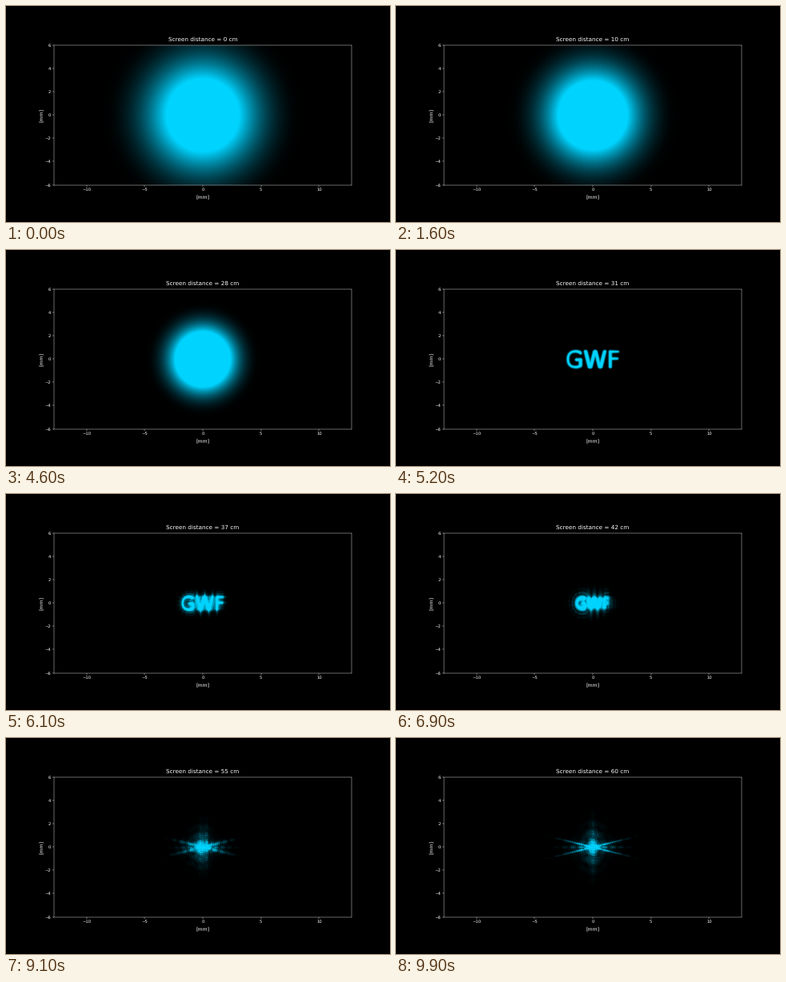
Write a matplotlib script that moves like this. It is 480 px wide and 270 px high and loops after 10000 ms.

```python
import numpy as np
import matplotlib.pyplot as plt
from matplotlib.animation import FuncAnimation
from matplotlib.textpath import TextPath

# Lengths in mm: a converging Gaussian beam meets a letter-shaped aperture
# halfway to its focus and diffracts from there on.
WAVELENGTH = 488e-6
FOCUS = 600.0
APERTURE_Z = 300.0
WAIST = 4.0
PEAK = 3.4
HALF_W, HALF_H = 12.8, 6.0
BEAM_COLOR = np.array([0, 212, 255]) / 255

FRAMES = 100
NX, NY, STEP = 960, 648, 0.012
BLOCK = 3


def centered(n, step):
    return (np.arange(n) - (n - 1) / 2) * step


def gaussian_beam(r2, z):
    shrink = 1 - z / FOCUS
    return PEAK / shrink**2 * np.exp(-2 * r2 / (WAIST * shrink) ** 2)


def brightness(intensity):
    """Clip to the display range and apply the sRGB curve."""
    lin = np.clip(intensity, 0, 1)
    return np.where(lin <= 0.0031308, 12.92 * lin, 1.055 * lin ** (1 / 2.4) - 0.055)


def block_mean(a, k):
    h, w = a.shape
    return a.reshape(h // k, k, w // k, k).mean(axis=(1, 3))


def letter_mask(text, size, nx=480, ny=192, sub=3):
    path = TextPath((0, 0), text, size=size, prop={"family": "DejaVu Sans"})
    box = path.get_extents()
    gx, gy = np.meshgrid(centered(nx * sub, STEP / sub), centered(ny * sub, STEP / sub))
    points = np.column_stack([gx.ravel() + (box.x0 + box.x1) / 2,
                              gy.ravel() + (box.y0 + box.y1) / 2])
    inside = path.contains_points(points).reshape(gx.shape).astype(float)
    mask = np.zeros((NY, NX))
    top, left = (NY - ny) // 2, (NX - nx) // 2
    mask[top:top + ny, left:left + nx] = block_mean(inside, sub)
    return mask


x, y = centered(NX, STEP), centered(NY, STEP)
R2 = x[None, :] ** 2 + y[:, None] ** 2
FX, FY = np.fft.fftfreq(NX, STEP), np.fft.fftfreq(NY, STEP)
F2 = FX[None, :] ** 2 + FY[:, None] ** 2


def aperture_spectrum():
    soften = np.exp(-2 * np.pi**2 * 0.012**2 * F2)
    mask = np.fft.ifft2(np.fft.fft2(letter_mask("GWF", 2.12)) * soften).real
    curvature = np.exp(-1j * np.pi * R2 / (WAVELENGTH * (FOCUS - APERTURE_Z)))
    return np.fft.fft2(mask * np.sqrt(gaussian_beam(R2, APERTURE_Z)) * curvature)


SPECTRUM = aperture_spectrum()


def diffracted(distance):
    phase = np.pi * WAVELENGTH * distance
    transfer = np.exp(-1j * phase * FY**2)[:, None] * np.exp(-1j * phase * FX**2)[None, :]
    field = np.fft.ifft2(SPECTRUM * transfer)
    return field.real**2 + field.imag**2


DISC_NX, DISC_NY = 744, 348
disc_x = centered(DISC_NX, 2 * HALF_W / DISC_NX)
disc_y = centered(DISC_NY, 2 * HALF_H / DISC_NY)
DISC_R2 = disc_x[None, :] ** 2 + disc_y[:, None] ** 2


def screen(z):
    """Image and half extents of the light on a screen at distance z."""
    if z < APERTURE_Z:
        return brightness(gaussian_beam(DISC_R2, z)), HALF_W, HALF_H
    light = block_mean(brightness(diffracted(z - APERTURE_Z)), BLOCK)
    return light, NX * STEP / 2, NY * STEP / 2


plt.style.use("dark_background")
plt.rcParams["text.hinting"] = "none"
fig, ax = plt.subplots(figsize=(12.8, 7.2), dpi=37.5)
image = ax.imshow(np.zeros((2, 2, 3)), origin="lower", interpolation="hanning",
                  extent=(-HALF_W, HALF_W, -HALF_H, HALF_H))
ax.set(xlim=(-HALF_W, HALF_W), ylim=(-HALF_H, HALF_H),
       xticks=range(-10, 11, 5), yticks=range(-6, 7, 2))
ax.set_xlabel("[mm]", fontsize=12, labelpad=8)
ax.set_ylabel("[mm]", fontsize=12, labelpad=1)
title = ax.set_title("", fontsize=14, pad=10)


def update(frame):
    cm = 0.6 * frame + 0.2
    light, half_w, half_h = screen(10 * cm)
    image.set_data(np.clip(light[..., None] * BEAM_COLOR, 0, 1))
    image.set_extent((-half_w, half_w, -half_h, half_h))
    title.set_text(f"Screen distance = {cm:.0f} cm")
    return image, title


anim = FuncAnimation(fig, update, frames=FRAMES, interval=100, repeat=True,
                     repeat_delay=0, blit=False)
plt.show()
```
